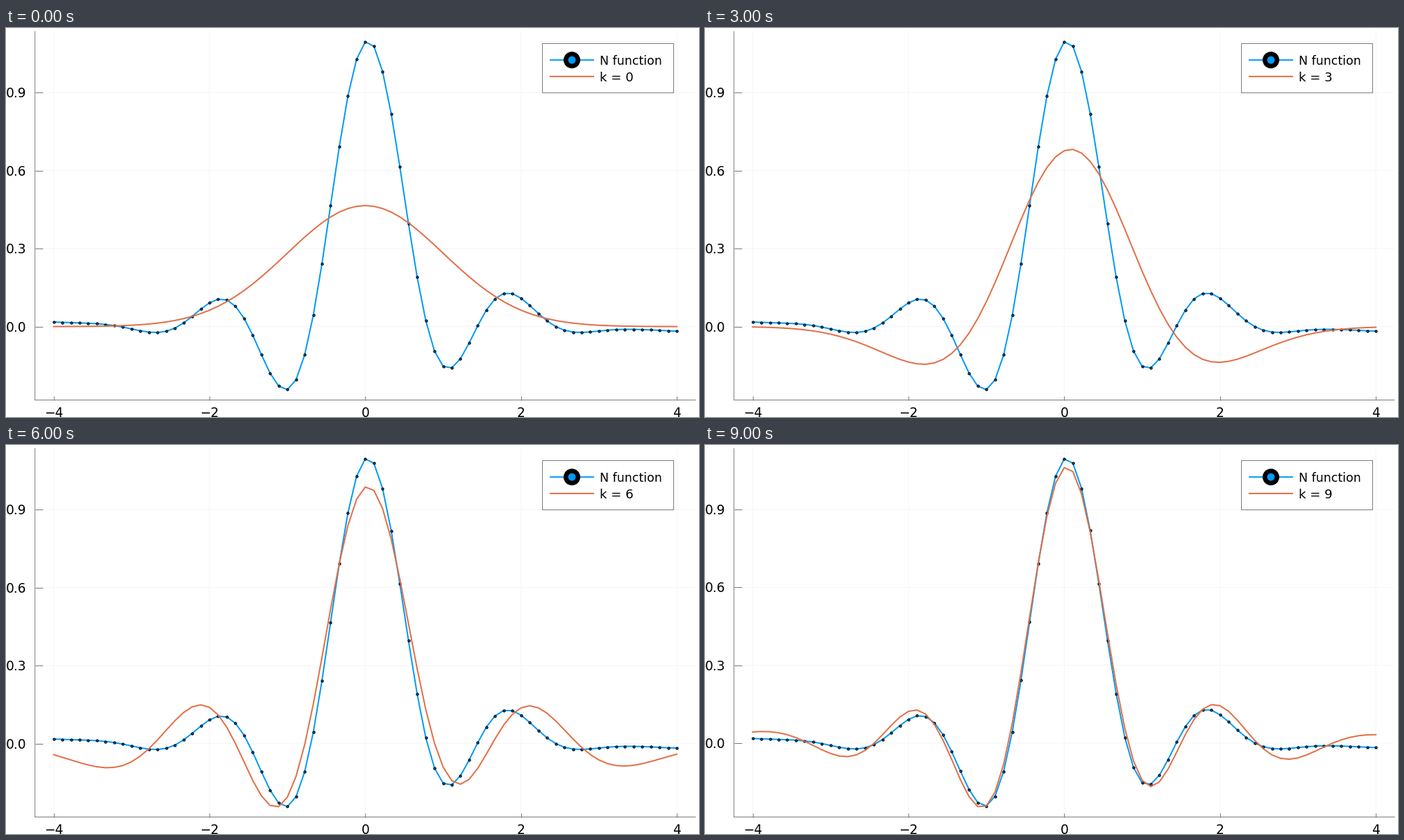
A matplotlib script for the animation above (10 s loop, 998 by 561 pixels).

```python
import numpy as np
import matplotlib.pyplot as plt
from matplotlib.animation import FuncAnimation
from matplotlib.patches import Circle, Rectangle

W, H, DPI = 998, 561, 64
PX = 72 / DPI  # points per pixel
LEFT, RIGHT, TOP, BOTTOM = 41.7, 993, 5, 536.5
BLUE, ORANGE, AXIS, GRID = "#009af9", "#e26f46", "#7c7c7c", "#f6f6f6"
PAD = 0.03
TERMS = 10

plt.rcParams["font.family"] = "DejaVu Sans"


def n_function(x):
    """Short Fourier series on [-4, 4] with a slight linear trend."""
    cosines = [0.1093, 0.2059, 0.1863, 0.2038, 0.2146, 0.1352, 0.0373, 0.0026]
    sines = [0, 0.0312, 0.0249, 0.0212, 0.016, 0.0095, 0.0049, 0.0017]
    angle = np.outer(np.arange(len(cosines)), x) * np.pi / 4
    return cosines @ np.cos(angle) + sines @ np.sin(angle) - 0.0044 * x


def hermite_functions(x, count):
    """Orthonormal Hermite functions of order 0 to count - 1."""
    psi = [np.pi ** -0.25 * np.exp(-x ** 2 / 2)]
    psi.append(np.sqrt(2) * x * psi[0])
    for n in range(2, count):
        psi.append(np.sqrt(2 / n) * x * psi[-1] - np.sqrt((n - 1) / n) * psi[-2])
    return np.array(psi)


x = np.linspace(-4, 4, 73)
signal = n_function(x)
basis = hermite_functions(x, TERMS)

# Project onto the basis with the trapezoid rule, then add term by term
weights = np.full(len(x), x[1] - x[0])
weights[[0, -1]] /= 2
coeffs = basis @ (weights * signal)
partial_sums = np.cumsum(coeffs[:, None] * basis, axis=0)

fig = plt.figure(figsize=(W / DPI, H / DPI), dpi=DPI, facecolor="white")

# Plot area
ax = fig.add_axes([LEFT / W, 1 - BOTTOM / H, (RIGHT - LEFT) / W, (BOTTOM - TOP) / H])
x_ticks, y_ticks = range(-4, 5, 2), (0, 0.3, 0.6, 0.9)
ax.set_xlim(-4 - 8 * PAD, 4 + 8 * PAD)
ax.set_xticks(x_ticks)
ax.set_yticks(y_ticks)
ax.set_axisbelow(True)
ax.grid(color=GRID, lw=PX, snap=False)
ax.tick_params(direction="in", color=AXIS, width=PX,
               labelbottom=False, labelleft=False)
ax.tick_params(axis="x", length=6 * PX)
ax.tick_params(axis="y", length=11 * PX)
for side, spine in ax.spines.items():
    spine.set_visible(side in ("left", "bottom"))
    spine.set(color=AXIS, lw=PX, snap=False)


def tick_label(text, xy, coords, offset, ha):
    ax.annotate(text, xy, xycoords=coords, xytext=offset,
                textcoords="offset pixels", ha=ha, va="baseline",
                fontsize=18.6 * PX, annotation_clip=False)


for t in x_ticks:
    tick_label(str(t).replace("-", "\u2212"), (t, 0),
               ax.get_xaxis_transform(), (0, -24.5), "center")
for t in y_ticks:
    tick_label(f"{t:.1f}", (0, t), ax.get_yaxis_transform(), (-12.2, -7), "right")

ax.plot(x, signal, color=BLUE, lw=2 * PX, marker="o", ms=3 * PX,
        mec="black", mew=1.3 * PX)
curve, = ax.plot(x, partial_sums[0], color=ORANGE, lw=2 * PX)

# Legend, laid out in pixels
key = fig.add_axes([0, 0, 1, 1])
key.set(xlim=(0, W), ylim=(H, 0))
key.axis("off")
key.add_patch(Rectangle((772.5, 22.5), 189, 71, fc="white", ec=AXIS,
                        lw=PX, snap=False))
for y, color in ((46.2, BLUE), (69.9, ORANGE)):
    key.plot([783, 847], [y, y], color=color, lw=2 * PX,
             solid_capstyle="butt", snap=False)
key.add_patch(Circle((815, 46.2), 8.75, fc=BLUE, ec="black", lw=6.5 * PX, zorder=3))
key.text(855.5, 52.8, "N function", fontsize=17.4 * PX, va="baseline")
label = key.text(855.5, 76.8, "", fontsize=18.2 * PX, va="baseline")


def update(k):
    y = partial_sums[k]
    curve.set_ydata(y)
    label.set_text(f"k = {k}")
    low = min(signal.min(), y.min())
    high = max(signal.max(), y.max())
    margin = PAD * (high - low)
    ax.set_ylim(low - margin, high + margin)
    return curve, label


anim = FuncAnimation(fig, update, frames=TERMS, interval=1000, repeat=True)
plt.show()
```
